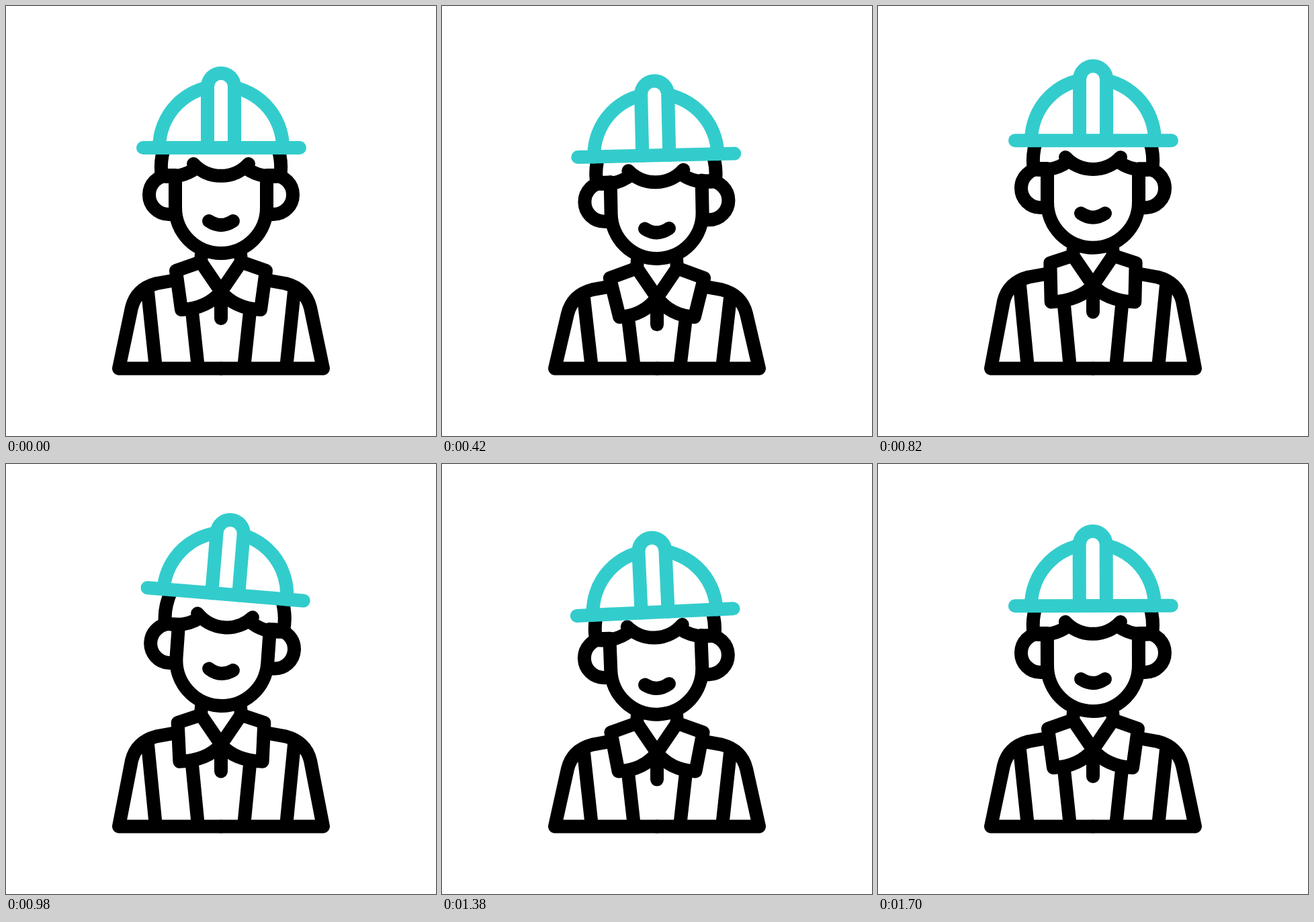
These frames come from a looping animation (640x640 px, 2200 ms). An HTML page:

```html
<!DOCTYPE html>
<html>
<head>
<meta charset="utf-8">
<style>
  html, body { margin: 0; height: 100%; overflow: hidden; background: #fff; }
  svg { display: block; width: 100%; height: 100%; }
</style>
</head>
<body>
<svg viewBox="0 0 640 640" fill="none" stroke="#000" stroke-width="20" stroke-linecap="round" stroke-linejoin="round">
  <g id="half">
    <path id="torso"/>
    <path id="collar" fill="#fff"/>
  </g>
  <use href="#half" transform="matrix(-1 0 0 1 640 0)"/>
  <path id="placket" d="M320 425V465"/>

  <path id="ears" d="M252 252H242A29 29 0 0 0 242 310H252M388 252H398A29 29 0 0 1 398 310H388"/>
  <path id="face" fill="#fff" d="M252 253V300A68 68 0 0 0 388 300V253"/>
  <path id="mouth" d="M302 320Q320 332 338 320"/>
  <g id="hair">
    <path id="lock" d="M238 203Q228 230 232 253Q262 257 283 241"/>
    <use href="#lock" transform="matrix(-1 0 0 1 640 0)"/>
    <path d="M279 235A56 56 0 0 0 361 235"/>
  </g>
  <g id="hat" fill="#fff" stroke="#3cc">
    <path d="M228 211A92 92 0 0 1 412 211"/>
    <path d="M300 211V120A20 20 0 0 1 340 120V211"/>
    <path d="M204 211H437"/>
  </g>
</svg>
<script>
const LOOP = 2200;
// One nod: rest, down, up, settle, rest
const nod = [[255, 0], [590, 1], [920, -0.85], [1280, 0.48], [1700, 0]];

function wave(t) {
  const i = nod.findIndex(([time]) => time > t);
  if (i < 1) return 0;
  const [t0, v0] = nod[i - 1], [t1, v1] = nod[i];
  const ease = (1 - Math.cos(Math.PI * (t - t0) / (t1 - t0))) / 2;
  return v0 + (v1 - v0) * ease;
}

const el = id => document.getElementById(id);

function place(id, dy, angle = 0, pivot = 320) {
  el(id).setAttribute('transform', `translate(0 ${dy}) rotate(${angle} 320 ${pivot})`);
}

// The body leads the nod, the hat follows and the tilt comes last
function draw(t) {
  const body = 13 * wave(t + 45);
  const head = wave(t + 30);
  const tilt = -5.6 * wave(t - 57);
  const y = v => v + body;
  const flap = v => v + 1.2 * body;
  const spread = 0.35 * body;

  el('torso').setAttribute('d',
    `M252 ${y(408)}L224 ${y(413)}Q194 ${y(421)} 187 ${y(449)}L168 539.5H320` +
    `M211 ${y(425)}L223 539.5M277 ${y(455)}L286 539.5M291 ${y(368)}L290 ${y(382)}`);
  el('collar').setAttribute('d',
    `M290 ${y(381)}L${253 - spread} ${flap(394)}L${261 + spread} ${flap(452)}` +
    `Q300 ${flap(450)} 320 ${y(425)}Z`);
  place('placket', body);

  place('ears', 15 * head, tilt * 0.65);
  place('face', 12.5 * head, tilt * 0.85);
  place('hair', 15 * head, tilt * 0.85);
  place('mouth', 20 * wave(t + 15), tilt * 0.85);
  place('hat', 23 * wave(t), tilt, 285);
}

const start = performance.now();
function tick() {
  draw((performance.now() - start) % LOOP);
  requestAnimationFrame(tick);
}
tick();
</script>
</body>
</html>
```
